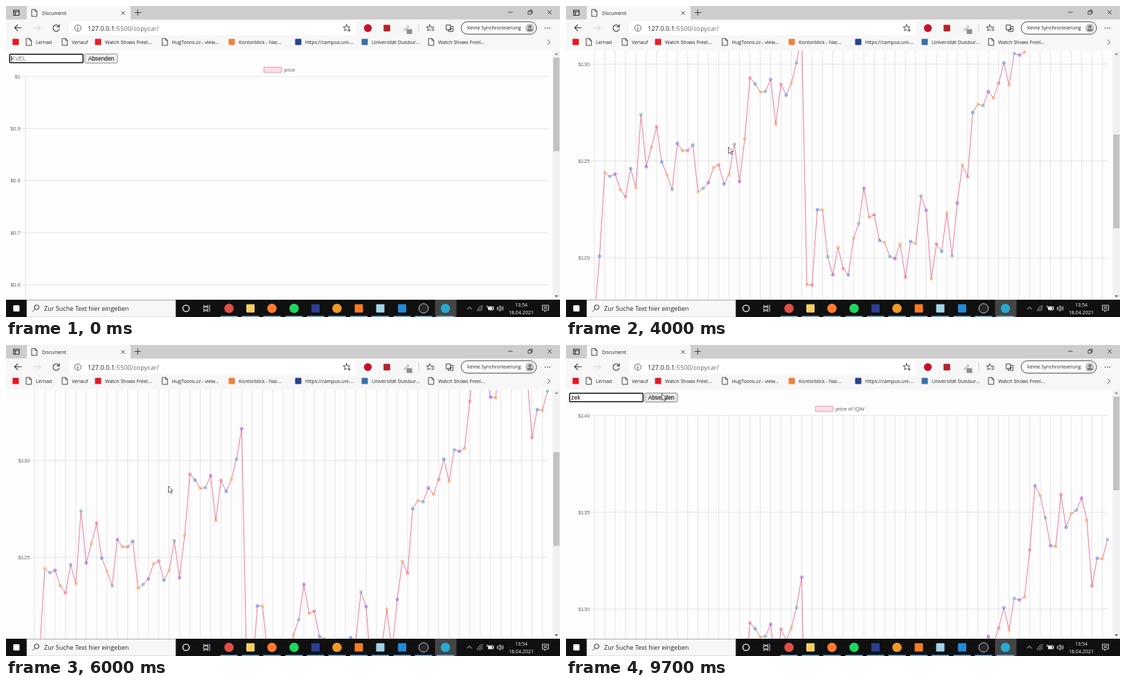
An HTML page for the animation above (9.8 s loop, 800x450 px).

```html
<!DOCTYPE html>
<html lang="de">
<head>
<meta charset="utf-8">
<title>Document</title>
<style>
html, body { margin: 0; width: 100%; height: 100%; overflow: hidden; background: #fdfdfe; }
svg { display: block; width: 800px; height: 450px; }
text { white-space: pre; }
.ui { font-family: "Open Sans", "Noto Sans", sans-serif; font-size: 7.1px; fill: #222; }
.web { font-family: "Liberation Sans", Arial, sans-serif; font-size: 8.33px; fill: #000; }
.tick { font-family: "Liberation Sans", Arial, sans-serif; font-size: 7.5px; fill: #666; }
.grid { stroke: #000; stroke-opacity: .13; stroke-width: .8; fill: none; }
.ico { fill: none; stroke: #333; stroke-width: .9; stroke-linecap: round; stroke-linejoin: round; }
.tray { fill: none; stroke: #eee; stroke-width: .9; }
</style>
</head>
<body>
<svg id="stage" viewBox="0 0 800 450" xmlns="http://www.w3.org/2000/svg"></svg>
<script>
const LOOP = 9800, STEP = 100;
const WORD1 = 'iqw', WORD2 = 'zek';

// ---------- markup helpers ----------
const rect = (x, y, w, h, fill, more = '') =>
  `<rect x="${x}" y="${y}" width="${w}" height="${h}" fill="${fill}" ${more}/>`;
const disc = (x, y, r, fill, more = '') =>
  `<circle cx="${x}" cy="${y}" r="${r}" fill="${fill}" ${more}/>`;
const path = (d, cls = 'ico', more = '') => `<path class="${cls}" d="${d}" ${more}/>`;
const text = (x, y, s, cls = 'ui', more = '') => `<text x="${x}" y="${y}" class="${cls}" ${more}>${s}</text>`;
const box = (x, y, size, fill) => rect(x - size / 2, y - size / 2, size, size, fill, 'rx="1"');
const group = (id, body, more = '') => `<g id="${id}" ${more}>${body}</g>`;
const page = (x, y) => path(`M${x - 3.5} ${y - 5}h4.5l2.7 2.7v7.3h-7.2zM${x + 1} ${y - 5}v2.7h2.7`);
const star = (x, y, r) => {
  let d = '';
  for (let i = 0; i < 10; i++) {
    const a = i * Math.PI / 5, q = i % 2 ? r * .45 : r;
    d += (i ? 'L' : 'M') + (x + q * Math.sin(a)).toFixed(1) + ' ' + (y - q * Math.cos(a)).toFixed(1);
  }
  return path(d + 'z');
};

// ---------- chart ----------
const TOP = 102, BASE = 802, LEFT = 41, RIGHT = 782, GAP = (RIGHT - LEFT) / 99;
// heights below the $140 line; 28 px are one dollar
const drops = [
  646, 558, 436.5, 442.5, 439, 461.5, 472, 431, 459, 353, 428.5, 400.5, 370.5, 421.5, 440.5, 461.5, 394.5, 405, 405, 397,
  465, 459.5, 451.5, 429.5, 425.5, 453.5, 439, 396, 450, 388.5, 300, 308.5, 320.5, 319.5, 302, 367, 309, 325, 307.5, 278,
  234, 599, 600, 490.5, 491, 558.5, 585, 545, 576, 585, 532, 510.5, 459.5, 501.5, 498, 535, 538, 558.5, 561.5, 540,
  588.5, 536.5, 540, 470.5, 491.5, 590.5, 540, 551, 495, 557.5, 481, 426, 443, 350, 338, 340, 319.5, 329, 307.5, 278,
  310.5, 264.5, 267, 262.5, 194.5, 101.5, 115.5, 148, 188.5, 189.5, 114.5, 162, 142, 137, 119.5, 151.5, 247, 206.5, 207.5, 179.5
];
const hues = ['255,99,132', '54,132,235', '255,176,70', '75,175,192', '143,82,245', '255,159,64'];
const px = i => LEFT + i * GAP;

function tradingDays(count) {
  const closed = ['Nov 26', 'Dec 25', 'Jan 01', 'Jan 18', 'Feb 15', 'Apr 02'];
  const out = [];
  for (let d = 20; out.length < count; d++) {
    const s = new Date(2020, 10, d, 12).toDateString();
    if (!s.startsWith('S') && !closed.includes(s.slice(4, 10))) out.push(s);
  }
  return out;
}

const legend = (x, label) =>
  rect(x, 88.6, 25.2, 7.6, 'rgba(255,99,132,.2)', 'stroke="#e2557f" stroke-width=".8" stroke-dasharray="1.3 .6"') +
  text(x + 28.8, 94.9, label, 'tick');

function emptyChart() {
  let s = legend(372.4, 'price') + path('M28.2 102V860', 'grid');
  for (let i = 0; i < 10; i++) {
    const y = TOP + i * 75.35;
    s += path(`M23 ${y}H784`, 'grid') + text(21, y + 2.6, '$' + (10 - i) / 10, 'tick', 'text-anchor="end"');
  }
  return s;
}

function priceChart() {
  let s = legend(360.4, 'price of ' + WORD1.toUpperCase());
  for (let i = 0; i < 6; i++) {
    const y = TOP + i * 140;
    s += path(`M36 ${y}H${RIGHT}`, 'grid') + text(34.4, y + 2.6, '$' + (140 - 5 * i), 'tick', 'text-anchor="end"');
  }
  tradingDays(100).forEach((day, i) => {
    if (i % 2) return;
    const x = px(i);
    s += path(`M${x} ${TOP}V${BASE + 5}`, 'grid') +
      text(0, 2.6, day, 'tick', `text-anchor="end" transform="translate(${x + 3} ${BASE + 9.5}) rotate(-50)"`);
  });
  s += '<path id="line" fill="none" stroke="#ec6890" stroke-width=".9"/>';
  drops.forEach((d, i) => {
    const c = hues[i % 6];
    s += disc(px(i), 0, 1.9, `rgba(${c},.25)`, `class="dot" stroke="rgb(${c})" stroke-width=".8"`);
  });
  return s;
}

// ---------- fixed parts ----------
function form() {
  return '<rect id="field" x="5.3" y="69.7" width="106" height="12.4" rx="1.2" fill="#fff"/>' +
    text(7.6, 78.8, '', 'web', 'id="value"') +
    '<path id="caret" stroke="#000" stroke-width=".8"/>' +
    '<rect id="button" x="113.8" y="69.5" width="47.2" height="13" rx="1.5" stroke="#767676" stroke-width=".8"/>' +
    text(118.7, 78.8, 'Absenden', 'web');
}

function browser() {
  let s = rect(0, 0, 800, 20, '#cdcdcd') + rect(0, 19.5, 800, 45, '#f7f7f7') +
    path('M30 20V3q0-3 3-3H177q3 0 3 3V20z', '', 'fill="#f7f7f7"');
  s += path('M11 6h8v7.5h-8zM11 8h8M13.5 8v5', 'ico', 'style="stroke-width:1.2"');
  s += page(41, 10) + text(52, 12.6, 'Document', 'ui', 'style="font-size:7.2px"');
  s += path('M166.8 7.8l4.6 4.6m0-4.6l-4.6 4.6M186 9.5h8.4M190.2 5.3v8.4M725.5 9h5.5M754.3 7.7h4.2v4.2h-4.2zM755.8 7.6v-1.5h4.2v4.2h-1.4M782.6 6.7l5 5m0-5l-5 5');
  s += path('M22.2 31.5H12.5m4.4-4.4l-4.4 4.4l4.4 4.4', 'ico', 'style="stroke-width:1.1"');
  s += path('M40 31.5h9.7m-4.4-4.4l4.4 4.4l-4.4 4.4', 'ico', 'style="stroke:#ccc"');
  s += path('M76.6 30A4.6 4.6 0 1 0 77 33M77 26.8v3.4h-3.4', 'ico', 'style="stroke-width:1.1"');
  s += rect(91, 22, 414, 20, '#fff', 'rx="3"') + disc(103.7, 32, 4.6, 'none', 'stroke="#555" stroke-width=".9"') +
    path('M103.7 31.5v3M103.7 29.6v.1');
  s += text(118, 35.5, '127.0.0.1<tspan fill="#6b6b6b">:5500/copycar/</tspan>', 'ui', 'style="font-size:9.25px"');
  s += star(491.7, 31.8, 5) + disc(495.5, 35, 3, '#fff') + path('M493.5 35h4M495.5 33v4');
  s += disc(522.5, 32, 5.7, '#c8102e') + box(550, 32, 9.5, '#b3202c');
  s += path('M575 35l5-6.5l1.8 1.4l-5 5.5z', 'ico', 'style="stroke:#999"') + rect(578.5, 33.5, 8, 7, '#8f8f8f');
  s += path('M596 26v12', 'ico', 'style="stroke:#ccc"') + star(611.8, 32, 4.8) +
    rect(613.5, 30, 5, 6.5, '#f7f7f7') + path('M614 30.6h4M615 33h3M615.5 35.3h2.5');
  s += path('M636 27.5h6v7h-6zM638.5 34.6v2.2h7v-7.3h-3M640.2 33h3.8M642.1 31.1v3.8');
  s += rect(657.3, 22.8, 108.7, 18, '#fdfdfd', 'rx="9" stroke="#333" stroke-width=".9"') +
    text(666, 34.3, 'Keine Synchronisierung') + disc(756.5, 32, 6.6, '#c4c4c4') +
    disc(756.5, 30, 2.2, '#777') + path('M752.5 36.3q0-3.3 4-3.3t4 3.3z', '', 'fill="#777"');
  s += [778.6, 782, 785.4].map(x => disc(x, 32, .8, '#222')).join('');
  const marks = [
    [14, '#e8161c', ''], [33, 0, 'Lernad'], [85, 0, 'Verlauf'], [133, '#e01f26', 'Watch Shows Freel...'],
    [229.5, 0, 'HugToons.zz - view...'], [326, '#e8853a', 'Kontorblick - Nac...'],
    [422, '#26418f', 'https://campus.uni-...'], [518, '#3a6ea8', 'Universität Duisbur...'], [614, 0, 'Watch Shows Freel...']
  ];
  for (const [x, fill, label] of marks)
    s += (fill ? box(x, 52, 9, fill) : page(x, 52)) + text(x + 10, 54.8, label);
  return s + path('M782.3 49l3.3 3.3l-3.3 3.3');
}

function scrollbar() {
  return rect(789.5, 64.5, 10.5, 361, '#f1f1f1') +
    path('M792.4 70.6l2.4-2.6l2.4 2.6z', '', 'fill="#777"') +
    path('M792.4 418.7l2.4 2.6l2.4-2.6z', '', 'fill="#444"') +
    rect(790.3, 74.8, 8.9, 135.4, '#c1c1c1', 'id="thumb"');
}

function taskbar() {
  let s = rect(0, 425, 800, 25, '#101010') + box(15, 437.5, 9, '#fff') +
    rect(30, 425.3, 215, 24.7, '#f7f7f7', 'stroke="#aaa" stroke-width=".6"');
  s += disc(44.3, 436, 3.3, 'none', 'stroke="#222"') + path('M41.9 438.5l-3.4 3.6') +
    text(55, 441.2, 'Zur Suche Text hier eingeben', 'ui', 'style="font-size:9.07px"');
  s += disc(260, 437.5, 4.6, 'none', 'stroke="#fff" stroke-width="1.3"');
  s += path('M285.5 432.5v1.7h6v-1.7M285.5 435.5h6v4.3h-6zM285.5 442.7v-1.7h6v1.7M294 432.5v10', 'tray');
  s += rect(619.5, 425, 31, 25, '#454545');
  const apps = [
    [322, 1, '#dd5144'], [353, 0, '#f4cf66'], [384, 1, '#ff7b2c'], [416, 1, '#1ed760'], [447, 0, '#2b3f94'], [478, 1, '#f19a2b'],
    [509.5, 0, '#f67c28'], [540.5, 0, '#a5d3e6'], [572, 0, '#2489d2'], [603, 1, '#26262a'], [634.5, 1, '#28a9cf']
  ];
  apps.forEach(([x, round, fill], i) => {
    s += round ? disc(x, 437.5, 6.8, fill, i === 9 ? 'stroke="#ddd" stroke-width=".9"' : '') : box(x, 437.5, 12, fill);
    s += rect(x - 12.5, 448.5, 25, 1.5, '#76b9ed');
  });
  s += path('M665.8 439l3.4-3.4l3.4 3.4', 'tray');
  s += path('M681 441.5a8 8 0 0 1 7.5-8M683.3 441.5a5.5 5.5 0 0 1 5.2-5.5M685.6 441.5a3 3 0 0 1 2.9-3', 'tray', 'style="stroke:#bbb"');
  s += path('M696.5 435h7v4.8h-7zM704.3 436.3v2.2M695 433v4', 'tray') + rect(697, 435.5, 5, 4, '#eee');
  s += path('M709.5 436h1.8l2.5-2.3v7.8l-2.5-2.3h-1.8zM715.3 435.5q1.5 2 0 4M717 434.3q2.3 3.2 0 6.4', 'tray');
  s += text(744, 434.6, '13:54', 'ui', 'text-anchor="middle" style="fill:#fff"') +
    text(744, 446, '18.04.2021', 'ui', 'text-anchor="middle" style="fill:#fff"');
  return s + path('M774.5 433h9v7h-3.4l-2.2 2.3v-2.3h-3.4zM776.3 435.3h5.4M776.3 437.5h5.4', 'tray');
}

const stage = document.getElementById('stage');
stage.innerHTML =
  '<clipPath id="view"><rect y="64.5" width="789.5" height="360.5"/></clipPath>' +
  rect(0, 0, 800, 450, '#fdfdfe') +
  group('pane', group('sheet', form() + group('before', emptyChart()) + group('after', priceChart())), 'clip-path="url(#view)"') +
  scrollbar() + browser() + taskbar() +
  group('arrow', path('M0 0V9.4L2.2 7.4L3.8 10.8L5.3 10.1L3.8 6.8H6.7z', '', 'fill="#fff" stroke="#222" stroke-width=".7"')) +
  group('beam', path('M-1.6-4.5h3.2M0-4.5v9M-1.6 4.5h3.2'));

const el = id => document.getElementById(id);
const dots = [...document.querySelectorAll('.dot')];
const show = (id, on) => el(id).setAttribute('display', on ? 'inline' : 'none');
const set = (id, attrs) => { for (const k in attrs) el(id).setAttribute(k, attrs[k]); };

// ---------- motion ----------
// smooth curve through [time, value] keys, flat at turning points
function track(keys, t) {
  const n = keys.length - 1;
  if (t <= keys[0][0]) return keys[0][1];
  if (t >= keys[n][0]) return keys[n][1];
  const rate = i => (keys[i + 1][1] - keys[i][1]) / (keys[i + 1][0] - keys[i][0]);
  const slope = i => {
    if (i === 0 || i === n) return 0;
    const a = rate(i - 1), b = rate(i);
    return a * b <= 0 ? 0 : 2 * a * b / (a + b);
  };
  let i = 0;
  while (t >= keys[i + 1][0]) i++;
  const h = keys[i + 1][0] - keys[i][0], u = (t - keys[i][0]) / h, v = 1 - u;
  return v * v * (1 + 2 * u) * keys[i][1] + u * v * v * h * slope(i) +
    u * u * (3 - 2 * u) * keys[i + 1][1] - u * u * v * h * slope(i + 1);
}

const scrollKeys = [[3250, 0], [3400, 8.5], [3700, 120], [4100, 340], [4400, 398], [4500, 398], [4600, 402.5],
  [5000, 452], [5400, 476.5], [5500, 478], [5700, 430], [6000, 215], [6300, 12], [6400, -5], [6500, -9.5], [6800, -4], [7300, 0]];
const xKeys = [[1200, 290], [1900, 146.5], [2200, 146.5], [2900, 234.5], [7800, 234.5], [8300, 62], [9300, 62], [9700, 138.5]];
const yKeys = [[1200, 230], [1900, 77.5], [2200, 77.5], [2900, 204], [7800, 204], [8300, 76], [9300, 76], [9700, 70.5]];

const typing = [[0, ''], [400, WORD1[0]], [600, WORD1.slice(0, 2)], [700, WORD1], [8500, WORD1.slice(0, 2)],
  [8600, WORD1[0]], [8700, ''], [8900, WORD2[0]], [9000, WORD2.slice(0, 2)], [9200, WORD2]];

function drawPrices(t) {
  const p = Math.min(1, Math.max(0, (t - 2200) / 1000)), k = 1 - (1 - p) ** 4;
  const ys = drops.map(d => BASE + (TOP + d - BASE) * k);
  set('line', { d: 'M' + ys.map((y, i) => px(i).toFixed(2) + ' ' + y.toFixed(2)).join('L') });
  dots.forEach((c, i) => c.setAttribute('cy', ys[i].toFixed(2)));
}

function draw(t) {
  const loaded = t >= 2300;
  show('before', !loaded);
  show('after', loaded);
  if (loaded) drawPrices(t);

  const y = track(scrollKeys, t);
  set('sheet', { transform: `translate(0 ${-y})` });
  set('thumb', { y: 74.8 + Math.max(0, y) * .3735 });

  const word = typing.filter(k => k[0] <= t).pop()[1];
  const focus = t < 2000 || t >= 8300;
  el('value').textContent = word || 'KVEL';
  el('value').style.fill = word ? '#000' : '#757575';
  set('field', { stroke: focus ? '#101010' : '#767676', 'stroke-width': focus ? 1.5 : .8 });
  const cx = 7.9 + (word ? el('value').getComputedTextLength() : 0);
  set('caret', { d: `M${cx} 71.8v8.4` });
  show('caret', t < 1400 || (t >= 8300 && t < 9500));

  const mx = track(xKeys, t), my = track(yKeys, t);
  const seen = (t >= 1300 && t < 8500) || t >= 9400;
  const inField = mx > 5 && mx < 111 && my > 69 && my < 83;
  const over = seen && mx > 113 && mx < 161 && my > 69 && my < 83;
  set('button', { fill: over ? '#e5e5e5' : '#efefef' });
  show('arrow', seen && !inField);
  show('beam', seen && inField);
  const at = { transform: `translate(${mx} ${my})` };
  set('arrow', at);
  set('beam', at);
}

const start = performance.now();
function tick() {
  const t = Math.max(0, performance.now() - start) % LOOP;
  draw(Math.floor(t / STEP) * STEP);
  requestAnimationFrame(tick);
}
tick();
</script>
</body>
</html>
```
